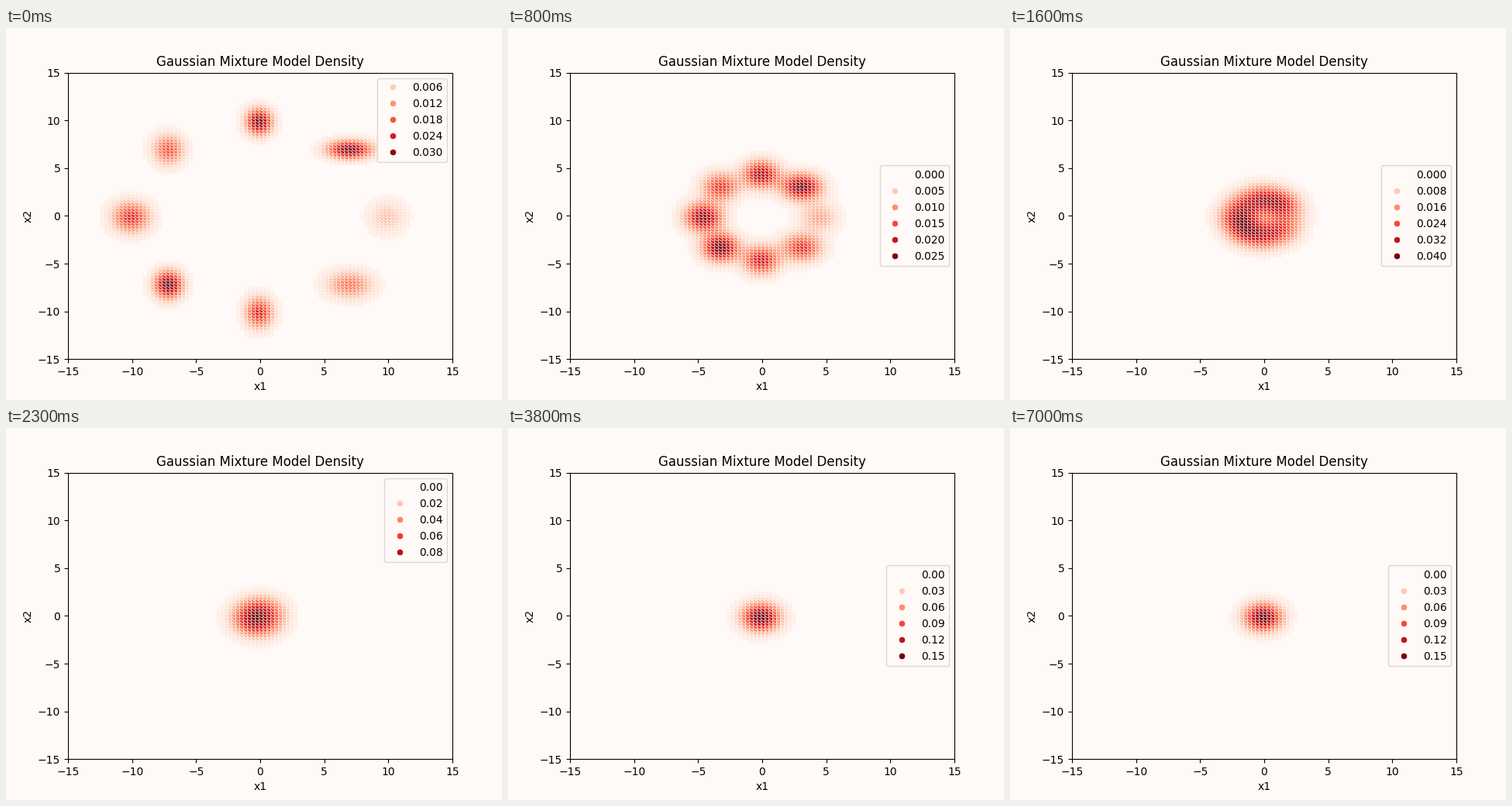
Animation, 640 px wide and 480 px high, one loop 7.5 s. Source, as a matplotlib script:

```python
import numpy as np
import matplotlib as mpl
import matplotlib.pyplot as plt
from matplotlib.animation import FuncAnimation
from matplotlib.lines import Line2D
from matplotlib.ticker import MaxNLocator

FRAMES, INTERVAL = 75, 100
PAPER = "#fffaf8"
EDGE = "#dcd6d4"
FLOOR = 0.03          # relative density below which a dot fades into the paper
UNDERFLOW = 7e-46     # smallest single-precision value

# Mixture components, one every 45 degrees on a circle of radius 10
weight = np.array([0.055, 0.157, 0.132, 0.105, 0.155, 0.155, 0.122, 0.115])
sd_x = np.array([0.98, 1.19, 0.70, 0.83, 0.99, 0.757, 0.745, 1.21])
sd_y = np.array([1.17, 0.663, 0.94, 1.08, 1.11, 1.00, 1.12, 0.985])
weight /= weight.sum()
angle = np.arange(8) * np.pi / 4
mean_x, mean_y = 10 * np.cos(angle), 10 * np.sin(angle)

axis = np.linspace(-15, 15, 100)
grid_x, grid_y = (g.ravel() for g in np.meshgrid(axis, axis, indexing="ij"))
points = np.column_stack([grid_x, grid_y])
reds = mpl.colormaps["Reds"]


def density(t):
    """Mixture density after diffusing for time t towards a unit Gaussian."""
    decay = np.exp(-t)
    total = np.zeros(len(points))
    for w, mx, my, sx, sy in zip(weight, mean_x, mean_y, sd_x, sd_y):
        vx = 1 + (sx**2 - 1) * decay**2
        vy = 1 + (sy**2 - 1) * decay**2
        dist = (grid_x - mx * decay)**2 / vx + (grid_y - my * decay)**2 / vy
        total += w * np.exp(-dist / 2) / (2 * np.pi * np.sqrt(vx * vy))
    return total


def draw_legend(low, peak):
    ticks = MaxNLocator(nbins=6).tick_values(0, peak)
    step = ticks[1] - ticks[0]
    digits = 2 if abs(step * 100 - round(step * 100)) < 1e-6 else 3
    shown = [v for v in ticks if low <= v <= peak]
    handles = []
    for v in shown:
        color = reds(v / peak) if v > 0 else PAPER
        handles.append(Line2D([], [], ls="", marker="o", ms=6, color=color,
                              mec=PAPER, mew=0.48, label=f"{v:.{digits}f}"))
    loc = "center right" if len(shown) > 5 else "upper right"
    ax.legend(handles=handles, loc=loc, facecolor=PAPER, edgecolor=EDGE,
              framealpha=1)


def update(i):
    p = density(i * INTERVAL / 1000)
    peak = p.max()
    level = p / peak
    near = level > 5e-4
    colors = reds(level[near])
    colors[level[near] < FLOOR] = mpl.colors.to_rgba(PAPER)
    dots.set_offsets(points[near])
    dots.set_facecolors(colors)
    low = 0 if p.min() < UNDERFLOW else p.min()
    draw_legend(low, peak)
    return []


fig, ax = plt.subplots(figsize=(6.4, 4.8), dpi=100, facecolor=PAPER)
ax.set_facecolor(PAPER)
ax.set(xlim=(-15, 15), ylim=(-15, 15), xlabel="x1", ylabel="x2",
       title="Gaussian Mixture Model Density")
dots = ax.scatter([], [], s=36, linewidths=0.48, edgecolors=PAPER)

anim = FuncAnimation(fig, update, frames=FRAMES, interval=INTERVAL,
                     init_func=lambda: update(0), repeat=True, repeat_delay=0)
plt.show()
```
